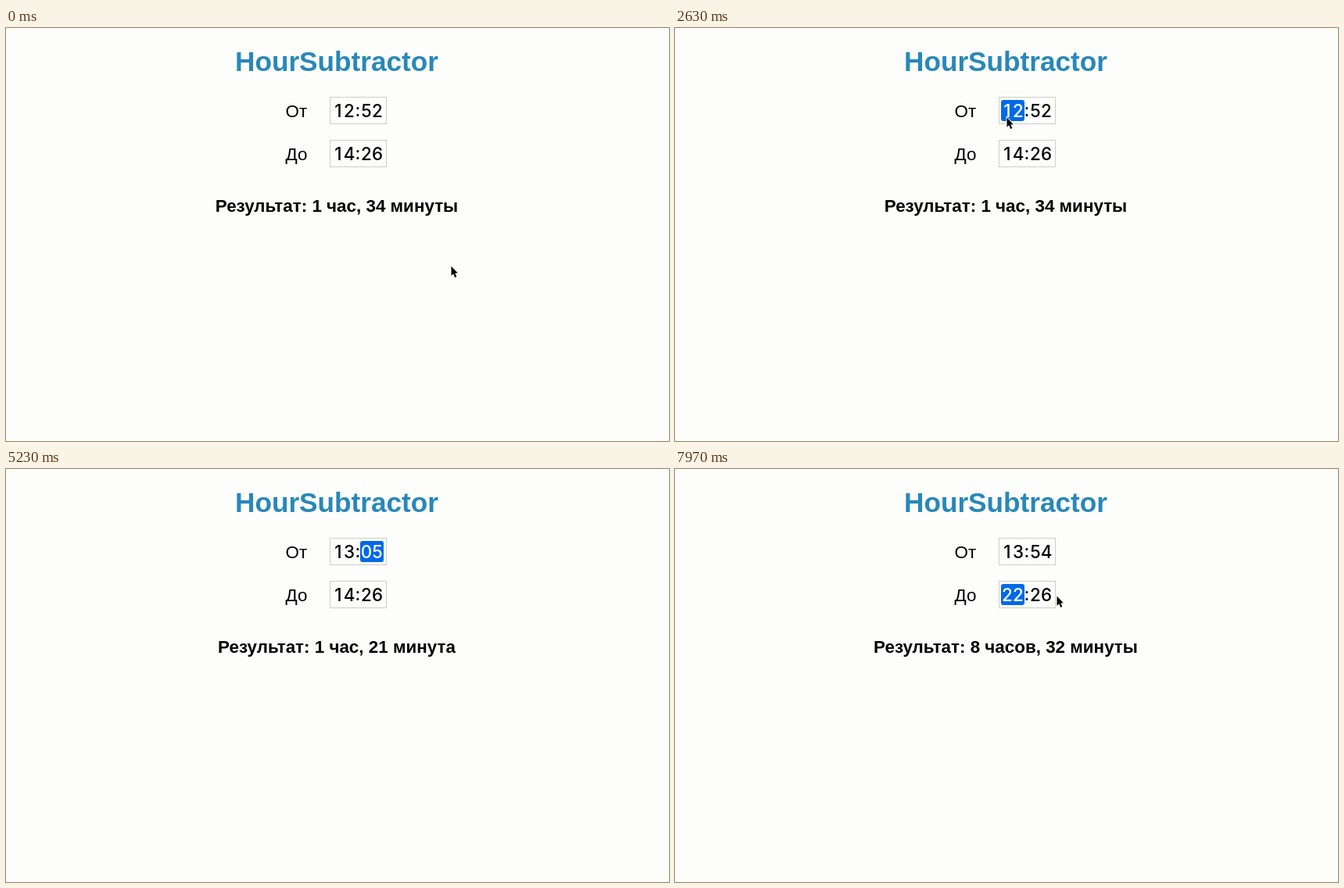
These frames come from a looping animation (848x528 px, 8 s). An HTML page with a canvas:

```html
<!DOCTYPE html>
<html lang="ru">
<head>
<meta charset="utf-8">
<title>HourSubtractor</title>
<style>
  html, body { margin: 0; width: 100%; height: 100%; overflow: hidden; background: #fdfdfb; }
  canvas { display: block; }
</style>
</head>
<body>
<canvas id="stage" width="848" height="528"></canvas>
<script>
const ctx = document.getElementById('stage').getContext('2d');
const LOOP = 8000;
const SIZE = 22.4;
const SANS = '"Liberation Sans", Arial, sans-serif';
const DIGITS = '500 ' + SIZE + 'px Inter, sans-serif';
const INK = '#000';
const BACK = '#fdfdfb';
const CENTER = 423;
const FIELD = { x: 414, width: 72, height: 34, middle: 450 };

const pad = n => String(n).padStart(2, '0');
const ease = u => u * u * (3 - 2 * u);

// Each action changes the state at its time; moves also depend on the time passed.
const script = [];
const at = (time, run) => script.push({ time, run });

function move(start, end, x, y, bulgeX = 0, bulgeY = 0) {
  at(start, (s, t) => {
    const u = Math.min(1, (t - start) / (end - start));
    const arc = Math.sin(Math.PI * u);
    s.x += (x - s.x) * ease(u) + bulgeX * arc;
    s.y += (y - s.y) * ease(u) + bulgeY * arc;
    s.pointer = true;
  });
}

function click(time, row, part) {
  at(time, s => {
    s.selected = { row, part };
    s.typing = false;
  });
}

// The first digit replaces the value, the next one is appended.
function press(time, digit) {
  at(time, s => {
    const { row, part } = s.selected;
    const clock = s.clocks[row];
    clock[part] = s.typing ? (clock[part] * 10 + digit) % 100 : digit;
    s.typing = true;
    s.pointer = false;
  });
}

move(130, 1100, 490, 276, 45, 20);
move(1150, 1900, 422, 98, 115, -145);
move(1960, 2100, 424, 114);
click(2130, 0, 0);
move(2730, 2870, 487, 178);
press(3030, 1);
press(3470, 3);
move(3870, 4030, 463, 107);
click(4200, 0, 1);
press(5030, 5);
press(5530, 4);
move(5950, 6330, 438, 155);
click(6370, 1, 0);
press(6930, 2);
press(7230, 2);
move(7600, 7940, 488, 162);

function stateAt(t) {
  const s = { x: 569, y: 304, pointer: true, clocks: [[12, 52], [14, 26]], selected: null };
  script.filter(a => a.time <= t).forEach(a => a.run(s, t));
  return s;
}

function plural(n, one, few, many) {
  const tens = n % 100, units = n % 10;
  if (tens > 10 && tens < 15) return many;
  return units === 1 ? one : units > 1 && units < 5 ? few : many;
}

function duration([h1, m1], [h2, m2]) {
  const total = ((h2 - h1) * 60 + m2 - m1 + 1440) % 1440;
  const h = Math.floor(total / 60), m = total % 60;
  const parts = [];
  if (h) parts.push(h + ' ' + plural(h, 'час', 'часа', 'часов'));
  if (m) parts.push(m + ' ' + plural(m, 'минута', 'минуты', 'минут'));
  return parts.join(', ');
}

function text(str, x, y, font, color = INK, align = 'center') {
  ctx.font = font;
  ctx.fillStyle = color;
  ctx.textAlign = align;
  ctx.fillText(str, x, y);
}

function field(label, clock, row, selected) {
  const top = 88 + row * 55, base = top + 26;
  text(label, 357.5, base, SIZE + 'px ' + SANS, INK, 'left');
  ctx.strokeStyle = '#cfcfc0';
  ctx.strokeRect(FIELD.x + 0.5, top + 0.5, FIELD.width, FIELD.height);
  text(':', FIELD.middle, base - 1, DIGITS);
  clock.forEach((value, part) => {
    const x = FIELD.middle + (part ? 18 : -18);
    const lit = selected && selected.row === row && selected.part === part;
    if (lit) {
      ctx.fillStyle = '#0069e6';
      ctx.beginPath();
      ctx.roundRect(x - 15, top + 4, 30, 27, 3);
      ctx.fill();
    }
    [...pad(value)].forEach((digit, i) => {
      text(digit, x + (i ? 7 : -7), base, DIGITS, lit ? '#fff' : INK);
    });
  });
}

const arrow = new Path2D('M.5 .5V12.8L3.2 10.3L5.2 15L7.3 14L5.3 9.6L8.8 9.3Z');

function pointer(x, y) {
  ctx.save();
  ctx.translate(x, y);
  ctx.lineWidth = 1.8;
  ctx.strokeStyle = '#fff';
  ctx.stroke(arrow);
  ctx.fillStyle = '#000';
  ctx.fill(arrow);
  ctx.restore();
}

function draw(t) {
  const { clocks, selected, pointer: shown, x, y } = stateAt(t);
  ctx.fillStyle = BACK;
  ctx.fillRect(0, 0, 848, 528);
  text('HourSubtractor', CENTER, 55, 'bold 35.2px ' + SANS, '#2788b9');
  field('От', clocks[0], 0, selected);
  field('До', clocks[1], 1, selected);
  text('Результат: ' + duration(...clocks), CENTER, 235, 'bold ' + SIZE + 'px ' + SANS);
  if (shown) pointer(x, y);
}

const start = performance.now();
function tick() {
  draw((performance.now() - start) % LOOP);
  requestAnimationFrame(tick);
}
tick();
</script>
</body>
</html>
```
